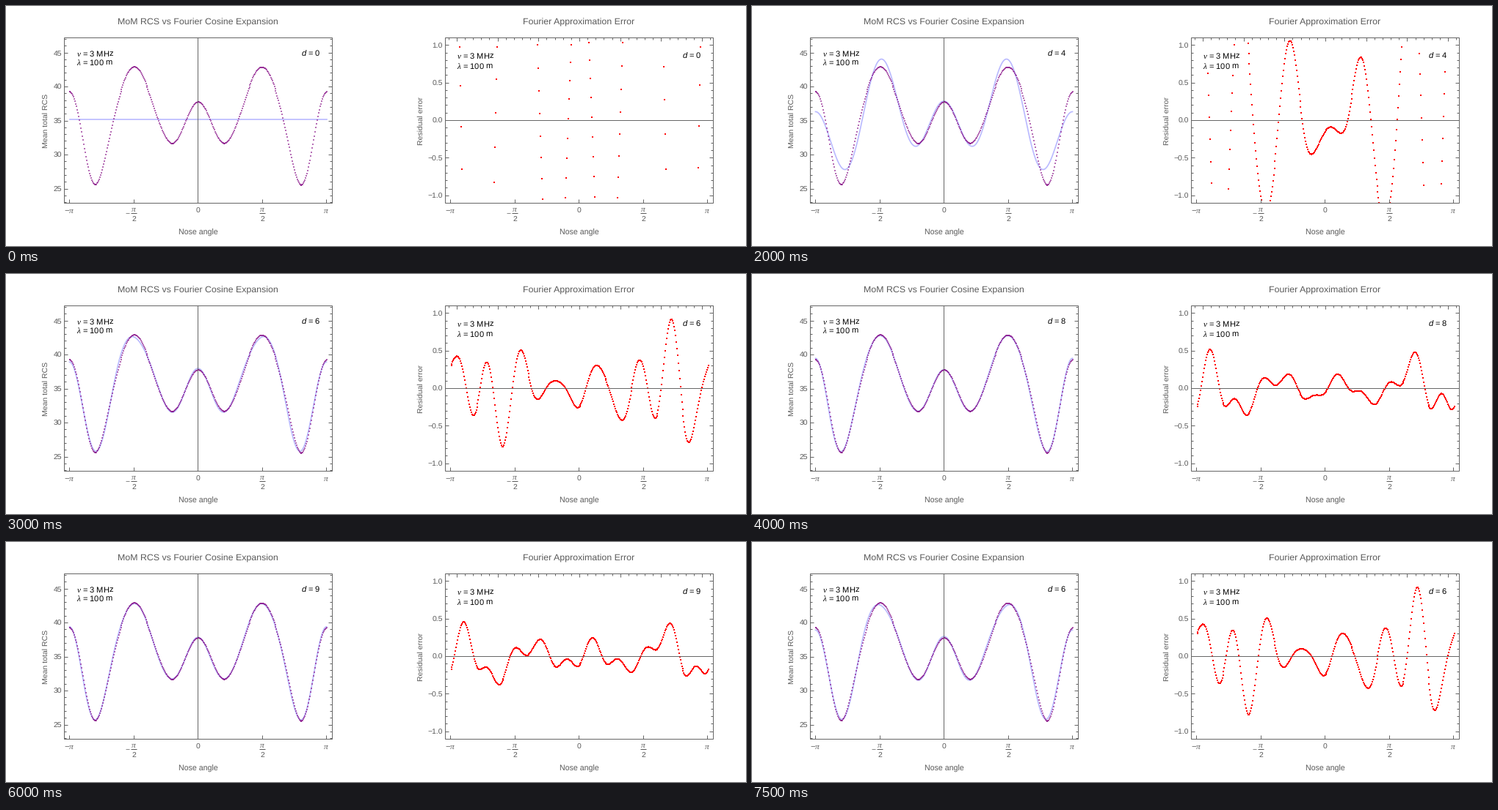
A matplotlib script for the animation above (8000 ms loop, 1008 px wide and 328 px high).

```python
import numpy as np
import matplotlib.pyplot as plt
from matplotlib.animation import FuncAnimation
from matplotlib.patches import Rectangle

W, H, DPI = 1008, 328, 100
PX = 72 / DPI
GRAY, INK = "#666666", "#5a5a5a"
TOP, BOTTOM, WIDTH = 43, 269, 365
HALF = 175  # pixels from angle 0 to angle pi
LAST = 10   # highest degree shown

plt.rcParams.update({
    "font.family": "Liberation Sans",
    "mathtext.fontset": "custom",
    "mathtext.rm": "Liberation Sans",
    "mathtext.it": "Liberation Serif:italic",
    "mathtext.sf": "Liberation Sans:italic",
    "text.hinting": "none",
})

# The data is a Fourier series; only its cosine part can be fitted
COS = [35.2, 1.65, -3.43, -.87, 5.36, -1.25, 1.35, -.365, .175, .065,
       -.12, .03, -.02]
SIN = [0, .034, -.065, -.02, .2, -.07, .07]

angle = np.radians(np.arange(-180, 181))
cosines = np.array([a * np.cos(k * angle) for k, a in enumerate(COS)])
data = cosines.sum(axis=0) + sum(b * np.sin(k * angle)
                                 for k, b in enumerate(SIN))


def rcs_y(v):
    return 250 - (v - 25) * 9.3


def err_y(v):
    return 156.5 - v * 102.73


fig = plt.figure(figsize=(W / DPI, H / DPI), dpi=DPI, facecolor="white")
ax = fig.add_axes([0, 0, 1, 1])
ax.set_xlim(0, W)
ax.set_ylim(H, 0)
ax.axis("off")


def line(x0, y0, x1, y1, color=GRAY):
    ax.plot([x0, x1], [y0, y1], color=color, lw=PX, zorder=4,
            solid_capstyle="butt")


def label(x, y, s, size=10.4, ha="center", color=INK):
    """Text whose capitals are vertically centred on y."""
    return ax.text(x, y + 0.36 * size, s, fontsize=size * PX, ha=ha,
                   va="baseline", color=color, zorder=7)


def signed(s):
    return s.replace("-", "\u2212")


def side_axis(left, to_y, step, count, first, fmt):
    """Ticks on both sides, every fifth one long and labelled."""
    right = left + WIDTH
    for k in range(first, first + count):
        y = to_y(k * step)
        n = 3 if k % 5 else 5
        line(left, y - 0.5, left + n, y - 0.5)
        line(right - n, y - 0.5, right, y - 0.5)
        if k % 5 == 0:
            label(left - 3, y, signed(fmt.format(k * step)), ha="right")


def pi_axis(mid):
    for k in range(-2, 3):
        x = mid + k * HALF / 2
        line(x - 0.5, BOTTOM - 5, x - 0.5, BOTTOM)
        if k == 0:
            label(x, 279, "0")
        elif k % 2 == 0:
            label(x, 279, "\u2212$\\pi$" if k < 0 else "$\\pi$", 11.5)
        else:
            label(x, 276.5, "$\\pi$", 11.5)
            line(x - 4, 283, x + 4, 283, INK)
            label(x, 290, "2")
            if k < 0:
                label(x - 5, 283, "\u2212", ha="right")


def panel(left, title, ylabel, ylabel_x, nu_y, lambda_y):
    """Frame and fixed text; returns the degree label to update."""
    mid = left + 182.5
    ax.add_patch(Rectangle((left, TOP), WIDTH, BOTTOM - TOP, fill=False,
                           ec=GRAY, lw=PX, zorder=4))
    pi_axis(mid)
    label(mid, 21.5, title, 12.4)
    label(mid, 308.5, "Nose angle", 10.6)
    ax.text(ylabel_x, 157, ylabel, fontsize=10.5 * PX, color=INK,
            rotation=90, ha="center", va="center")
    label(left + 16.5, nu_y, "$\\nu$ = 3 MHz", 11.1, "left", "black")
    label(left + 16.5, lambda_y, "$\\lambda$ = 100 m", 11.1, "left", "black")
    return label(left + 336, nu_y, "", 11.1, color="black")


def dots(x, y, color, alpha=1):
    return ax.plot(x, y, "s", ms=2 * PX, mew=0, color=color, alpha=alpha,
                   zorder=2)[0]


# Left: data and its expansion
LEFT = 79
px_l = LEFT + 182.5 + angle / np.pi * HALF
degree_l = panel(LEFT, "MoM RCS vs Fourier Cosine Expansion",
                 "Mean total RCS", 54, 65, 77)
side_axis(LEFT, rcs_y, 1, 25, 23, "{}")
line(LEFT + 182, TOP, LEFT + 182, BOTTOM)
fit, = ax.plot([], [], color="blue", alpha=0.27, lw=1.7 * PX, zorder=1)
dots(px_l, rcs_y(data), "purple", 0.57)

# Right: residual error
RIGHT = 598
px_r = RIGHT + 183.5 + angle / np.pi * HALF
degree_r = panel(RIGHT, "Fourier Approximation Error",
                 "Residual error", 565, 68, 82)
side_axis(RIGHT, err_y, 0.1, 21, -10, "{:.1f}")
for k in range(-16, 17):
    x = RIGHT + 183 + k * 0.2 / np.pi * HALF
    line(x, TOP, x, TOP + (3 if k % 5 else 5))
line(RIGHT, 156, RIGHT + WIDTH, 156)
error = dots([], [], "red")
for x, y, w, h in ((615, 60, 50, 29), (920, 61, 26, 14)):
    ax.add_patch(Rectangle((x, y), w, h, fc="white", ec="none", zorder=3))

FRAMES = 16


def draw(i):
    # Rise to the last degree, hold one step, then fall
    d = min(i, LAST, 2 * LAST + 1 - i)
    approx = cosines[:d + 1].sum(axis=0)
    fit.set_data(px_l, rcs_y(approx))
    residual = data - approx
    shown = np.abs(residual) <= 1.1
    error.set_data(px_r[shown], err_y(residual[shown]))
    for text in (degree_l, degree_r):
        text.set_text(f"$\\mathsf{{d}}$ = {d}")
    return fit, error, degree_l, degree_r


anim = FuncAnimation(fig, draw, frames=FRAMES, interval=500,
                     repeat=True, repeat_delay=0)
plt.show()
```
